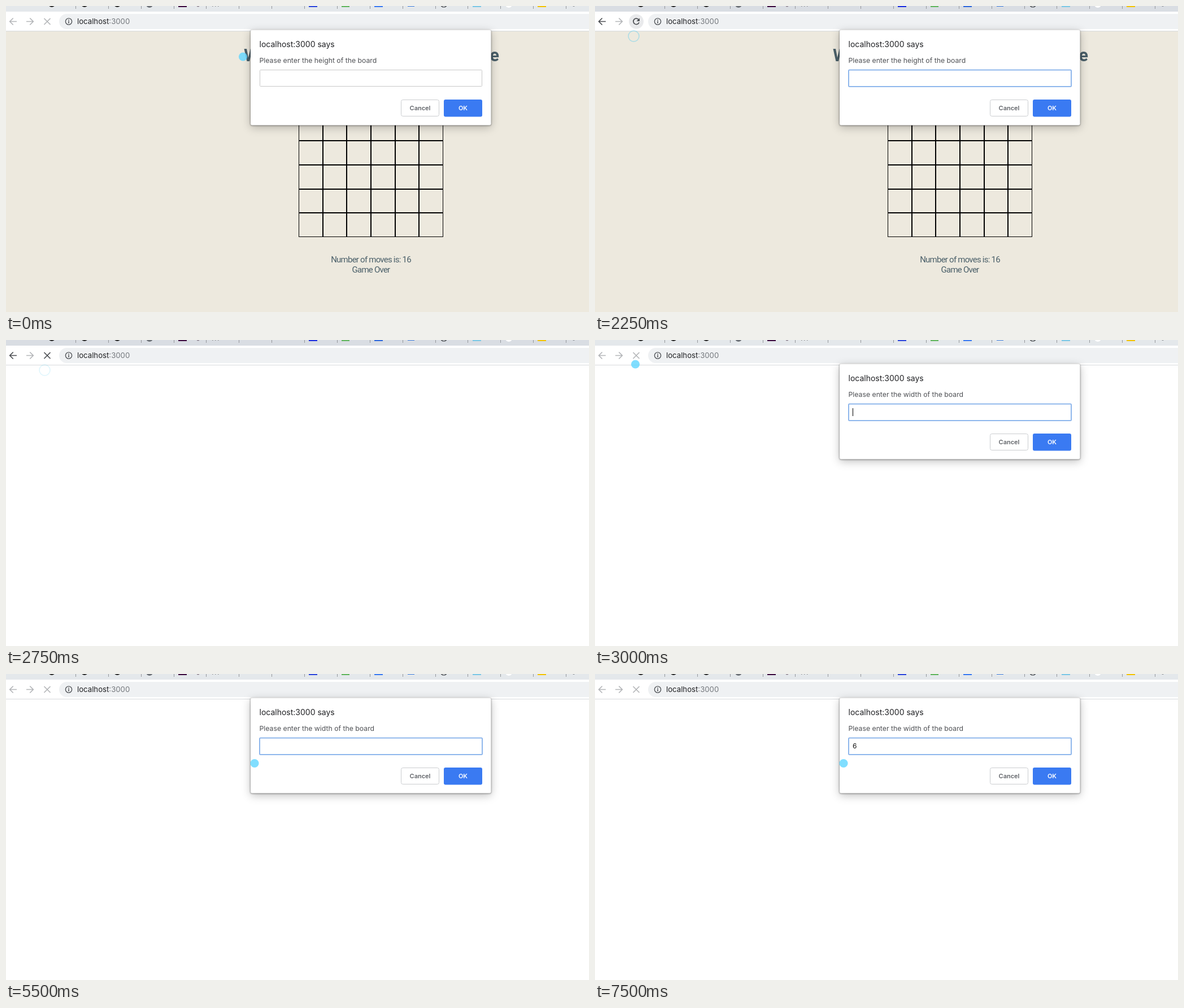
These frames come from a looping animation (1032x543 px, 8000 ms). An HTML page with a canvas:

```html
<!DOCTYPE html>
<html lang="en">
<head>
<meta charset="utf-8">
<title>Board prompt</title>
<style>
  html, body { margin: 0; width: 100%; height: 100%; overflow: hidden; background: #fff; }
  canvas { display: block; }
</style>
</head>
<body>
<canvas id="stage" width="1032" height="543"></canvas>
<script>
const ctx = document.getElementById('stage').getContext('2d');
const LOOP = 8000;
const UI = 'Inter, "Open Sans", sans-serif';
const PAGE = 'Roboto, sans-serif';

// Pointer positions: start time, x, y (no x means hidden)
const pointer = [
  [0, 419.5, 90], [250, 233.5, 69.5], [500, 128, 59], [750, 90, 43],
  [1000, 75, 36], [1250, 73, 35], [1500, 72, 34.5], [1750],
  [3000, 71.5, 43], [3750, 105.5, 29.5], [4000, 292, 117],
  [4250, 434.5, 147.5], [4500, 440, 158.5]
];

function rect(x, y, w, h, fill) {
  ctx.fillStyle = fill;
  ctx.fillRect(x, y, w, h);
}

function box(x, y, w, h, r, fill, stroke, lineWidth = 1) {
  ctx.beginPath();
  ctx.roundRect(x, y, w, h, r);
  if (fill) { ctx.fillStyle = fill; ctx.fill(); }
  if (stroke) { ctx.strokeStyle = stroke; ctx.lineWidth = lineWidth; ctx.stroke(); }
}

function disc(x, y, r, fill) {
  ctx.beginPath();
  ctx.arc(x, y, r, 0, 7);
  ctx.fillStyle = fill;
  ctx.fill();
}

function ring(x, y, r, stroke, lineWidth) {
  ctx.beginPath();
  ctx.arc(x, y, r, 0, Math.PI * 2);
  ctx.strokeStyle = stroke;
  ctx.lineWidth = lineWidth;
  ctx.stroke();
}

function path(d, stroke, lineWidth = 1.7) {
  ctx.strokeStyle = stroke;
  ctx.lineWidth = lineWidth;
  ctx.stroke(new Path2D(d));
}

function text(str, x, y, font, fill, align = 'left', spacing = 0) {
  ctx.font = font;
  ctx.fillStyle = fill;
  ctx.textAlign = align;
  ctx.letterSpacing = spacing + 'px';
  ctx.fillText(str, x, y);
}

function drawTabs(active) {
  rect(0, 0, 1032, 10, active ? '#d9dde3' : '#e4e8eb');
  for (let i = 0; i < 16; i++) rect(Math.round(123 + i * 57.87), 0, 1, 5, '#94979b');
  for (const x of [81, 139, 197]) disc(x, -4, 6, '#222');
  disc(254, -3, 6, '#6b7076');
  rect(305, 0, 15, 2, '#3d0b40');
  disc(340, -1, 2.5, '#8b7f8c');
  for (const x of [365, 370, 375]) rect(x, 0, 1.5, 1, '#888');
  rect(536, 0, 15, 2, active ? '#1c2ee0' : '#2f48dc');
  rect(594, 0, 14, 2, '#62b65f');
  rect(652, 0, 15, 2, active ? '#2f69dc' : '#3b7bf2');
  rect(711, 0, 12, 1, '#3b7bdc');
  ring(775, -4, 6, '#33363a', 1.2);
  rect(826, 0, 15, 2, '#7cc8e6');
  disc(890, -3, 6, '#fff');
  rect(941, 0, 15, 2, '#f3c300');
  disc(1005, -1, 2, '#83878c');
}

function drawToolbar(active, reload) {
  const dark = active ? '#4b4e52' : '#b4b6b9';
  rect(0, 10, 1032, 34, '#fff');
  rect(0, 44, 1032, 1, '#d7dadd');
  path('M19 27.5H7M12.7 21.5L6.7 27.5L12.7 33.5', dark);
  path('M36 27.5H48M42.3 21.5L48.3 27.5L42.3 33.5', '#b4b6b9');
  if (reload) {
    disc(73, 27.5, 13, '#e9eaec');
    path('M77.2 24.2A5.2 5.2 0 1 0 78 29', dark);
    ctx.fillStyle = dark;
    ctx.fill(new Path2D('M79 21.5V27H73.5Z'));
  } else {
    path('M67.5 22L78.5 33M78.5 22L67.5 33', dark);
  }
  box(94, 14, 980, 27, 13.5, '#eff1f3');
  ring(111, 27.5, 5.6, '#505357', 1.4);
  rect(110.2, 26.7, 1.6, 4, '#505357');
  rect(110.2, 24.2, 1.6, 1.6, '#505357');
  const font = '13.2px ' + UI;
  text('localhost', 126, 32, font, '#202124');
  text(':3000', 126 + ctx.measureText('localhost').width, 32, font, '#74787d');
}

function drawBoard() {
  const ink = '#4a5f69', left = 518, bottom = 410, cell = 42.67;
  text('W', 421, 98, '700 31px ' + PAGE, ink);
  text('e', 873, 98, '700 31px ' + PAGE, ink, 'right');
  for (let i = 0; i <= 6; i++) {
    const edge = i === 0 || i === 6;
    const x = Math.round(left + i * cell) - (i === 0 ? 0 : 1);
    const y = Math.round(bottom - i * cell) - 1;
    rect(x, 154, edge ? 1 : 2, 256, '#000');
    rect(left, y, 256, edge ? 1 : 2, '#000');
  }
  text('Number of moves is: 16', 646, 455, '15px ' + PAGE, ink, 'center', -0.77);
  text('Game Over', 646, 473, '15px ' + PAGE, ink, 'center', -0.77);
}

function drawDialog(dimension, focused, value, caret) {
  ctx.save();
  ctx.shadowColor = 'rgba(0,0,0,.25)';
  ctx.shadowBlur = 16;
  ctx.shadowOffsetY = 4;
  box(433, 42.5, 425.5, 169, 3, '#fff');
  ctx.shadowColor = 'rgba(0,0,0,.6)';
  ctx.shadowBlur = 3;
  ctx.shadowOffsetY = 0.5;
  box(433, 42.5, 425.5, 169, 3, '#fff');
  ctx.restore();
  text('localhost:3000 says', 448.5, 73, '14px ' + UI, '#202124');
  text(`Please enter the ${dimension} of the board`, 448.5, 101, '12.25px ' + UI, '#505256');
  if (focused) box(449, 113.5, 394, 29.5, 1.5, '#fff', '#8fb7ec', 2);
  else box(449.5, 113.5, 393, 29, 1, '#fff', '#c8c8c8');
  text(value, 456, 132, '12px ' + UI, '#111');
  if (caret) rect(value ? 464 : 456, 121, 1, 14, '#000');
  box(699.5, 166.5, 67, 29, 3, '#fff', '#cacccf');
  text('Cancel', 733, 185, '600 11px ' + UI, '#606368', 'center');
  box(775, 166, 68, 30.5, 3, '#3a7af2');
  text('OK', 809, 185, '600 11px ' + UI, '#fff', 'center');
}

function drawPointer(t) {
  const [, x, y] = pointer.findLast(p => t >= p[0]);
  if (x) disc(x, y, 7.6, 'rgba(96,214,255,.8)');
  if (t >= 1750 && t < 3000) {
    const step = Math.floor((t - 1750) / 250);
    if (step === 0) ring(68.5, 53.5, 6, 'rgba(96,206,240,.8)', 1.5);
    else ring(68.5, 53.5, 9.5, `rgba(96,206,240,${0.73 - step * 0.13})`, 1.5);
  }
}

function draw(t) {
  const active = t >= 1750 && t < 3000;
  const firstPrompt = t < 2500, secondPrompt = t >= 3000;
  rect(0, 0, 1032, 543, t < 2750 ? '#ede9de' : '#fff');
  drawTabs(active);
  drawToolbar(active, t >= 2250 && t < 2500);
  if (firstPrompt) {
    drawBoard();
    drawDialog('height', t >= 1750, '', t >= 1750 && t < 2250);
  } else if (secondPrompt) {
    drawDialog('width', true, t >= 7000 ? '6' : '', Math.floor(t / 500) % 2 === 0);
  }
  drawPointer(t);
}

let start;
function tick(now) {
  start ??= now;
  draw((now - start) % LOOP);
  requestAnimationFrame(tick);
}
draw(0);
requestAnimationFrame(tick);
</script>
</body>
</html>
```
